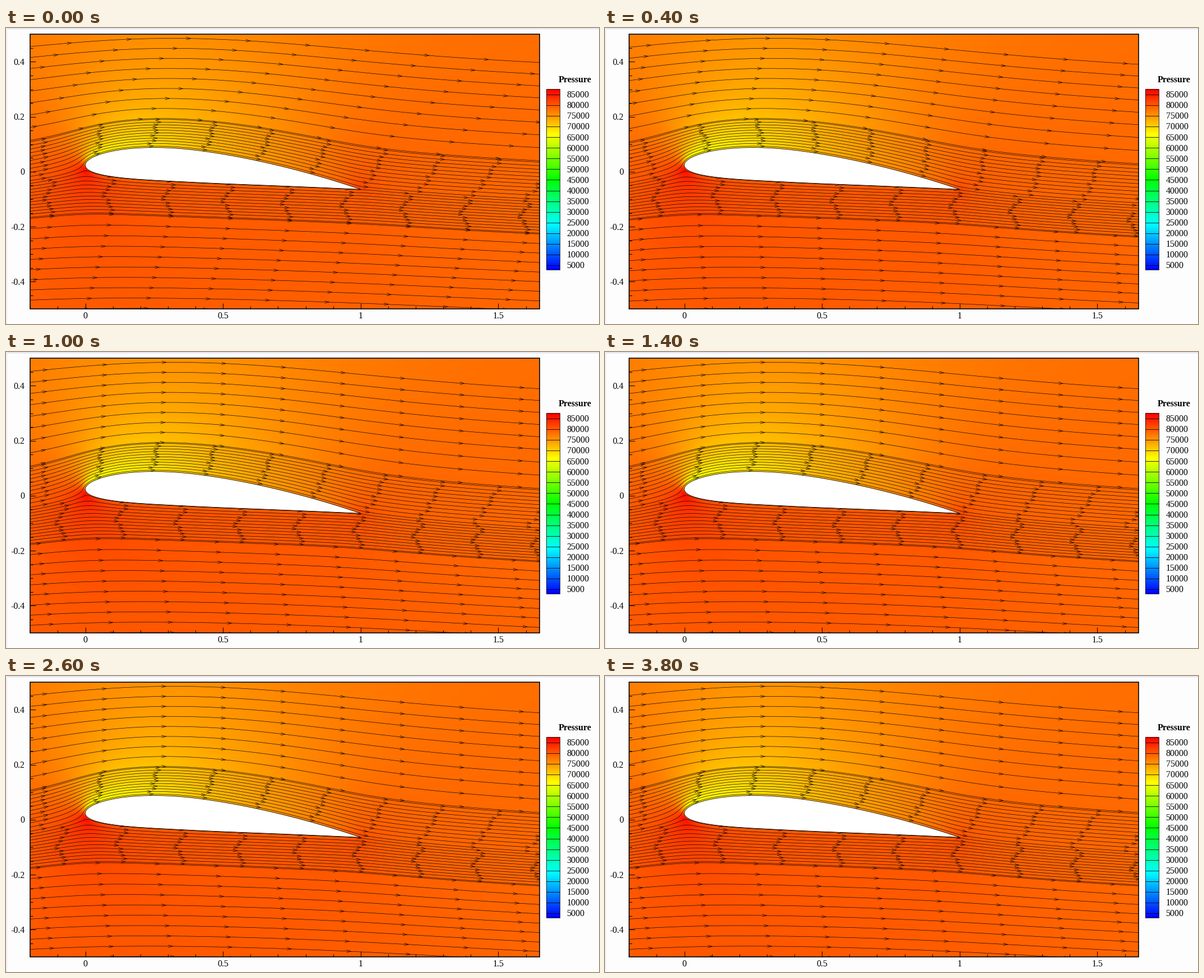
Write a matplotlib script that moves like this. It is 1058 px wide and 529 px high and loops after 4000 ms.

```python
import numpy as np
import matplotlib.pyplot as plt
from matplotlib.animation import FuncAnimation
from matplotlib.collections import LineCollection
from matplotlib.colors import LinearSegmentedColormap
from matplotlib.patches import Polygon, Rectangle

W, H, DPI = 1058, 529, 64
PX = 72 / DPI
FRAMES, STEP = 20, 200
L, R, T, B = 42.5, 951.5, 10.5, 501.5
NOSE_X, NOSE_Y, CHORD = 141, 244, 493
TILT = np.exp(-1j * np.radians(5.1))
P_FAR, P_DYN = 78700, 8800
P_MIN, P_MAX = 2900, 87600
plt.rcParams["font.family"] = "Liberation Serif"


# NACA 3412 section, in chord lengths
def camber(s, m=.03, p=.4):
    front = m / p ** 2 * (2 * p * s - s ** 2)
    rear = m / (1 - p) ** 2 * (1 - 2 * p + 2 * p * s - s ** 2)
    return np.where(s < p, front, rear)


def thickness(s):
    return .6 * (.2969 * np.sqrt(s) - .126 * s - .3516 * s ** 2
                 + .2843 * s ** 3 - .1036 * s ** 4)


def to_plane(x, y):
    return (x - NOSE_X + 1j * (NOSE_Y - y)) / CHORD


beta = np.linspace(0, 2 * np.pi, 121)
chordwise = (1 + np.cos(beta)) / 2
side = np.where(beta < np.pi, 1, -1)
nodes = (chordwise + 1j * (camber(chordwise) + side * thickness(chordwise))) * TILT
starts, spans = nodes[:-1], np.diff(nodes)
lengths = np.abs(spans)


def panel(z, j):
    """Stream function at z of a unit vortex sheet on panel j."""
    w = (z - starts[j]) * lengths[j] / spans[j]
    v = w - lengths[j]
    return (w * np.log(w) - v * np.log(v)).real - lengths[j]


# Sheet strengths: one flow with a smooth trailing edge, one of pure circulation
N = len(spans)
mid = starts + spans / 2
walls = np.column_stack([panel(mid, j) for j in range(N)] + [-np.ones(N)])
kutta = np.zeros(N + 1)
kutta[[0, N - 1]] = 1
full = np.linalg.solve(np.vstack([walls, kutta]), np.append(-mid.imag, 0))
total = np.append(lengths, 0)
spin = np.linalg.solve(np.vstack([walls, total]), np.append(np.zeros(N), total @ full))

X, Y = np.linspace(L, R, 304), np.linspace(0, 520, 261)
gx, gy = np.meshgrid(X, Y)
grid = to_plane(gx, gy) + 1e-7 * (1 + 1j)
PSI, PSI_SPIN = grid.imag.copy(), np.zeros(grid.shape)
for j in range(N):
    influence = panel(grid, j)
    PSI += full[j] * influence
    PSI_SPIN += spin[j] * influence

body = grid / TILT
s = np.clip(body.real, 0, 1)
outside = np.abs(body.imag - camber(s)) > thickness(s) + .01
outside |= np.abs(body.real - .5) > .505


def pressure(psi):
    u = np.gradient(psi, -Y / CHORD, axis=0)
    v = np.gradient(psi, X / CHORD, axis=1)
    p = P_FAR + P_DYN * (1 - u ** 2 - v ** 2)
    for col, ok in zip(p.T, outside.T):
        col[:] = np.interp(Y, Y[ok], col[ok])
    return p


# Seeds on a vertical rake through the thickest part of the wing
RAKE = np.argmin(np.abs(X - 285))
ABOVE = 18 + 17.9 * np.arange(9)
BELOW = 336 + 18.3 * np.arange(10)
OVER = np.linspace(163, 211, 11)
UNDER = np.linspace(273.5, 334, 12)
SEEDS = np.concatenate([ABOVE, OVER, UNDER, BELOW])
rng = np.random.default_rng(4)
RAGGED = rng.uniform(-5, 5, len(SEEDS))


def trace(psi):
    """Height of every streamline in each grid column."""
    levels = np.interp(SEEDS, Y, psi[:, RAKE])
    up = np.maximum.accumulate(psi[::-1], axis=0)
    return np.array([np.interp(levels, col, Y[::-1]) for col in up.T]).T


def arrow_places(k):
    """Horizontal places of the arrow heads on each streamline."""
    w = np.exp(-.8 * k)
    n = np.arange(-5, 12)
    kick = 30 * k * np.exp(1 - k)
    cols = 66 + 101.75 * n
    places = [281 + w * (44 - 24 * i) + 106.3 * n for i in range(len(ABOVE))]
    places += [cols + f * (kick - .058 * (cols - 60)) for f in np.linspace(0, 1, len(OVER))]
    places += [98 - 22 * w + 8 * np.sin(9 * f) + 106 * n
               for f in np.linspace(0, 1, len(UNDER))]
    places += [57 + 3 * i + w * (25 - 8 * i) + 106 * n for i in range(len(BELOW))]
    dense = (np.arange(len(SEEDS)) >= len(ABOVE)) & (SEEDS < BELOW[0])
    return [p + r * d for p, r, d in zip(places, RAGGED, dense)]


def heads(y, xs):
    out = []
    for x in xs[(xs > L + 6) & (xs < R - 1)]:
        y0, y1 = np.interp([x - 4, x + 4], X, y)
        tip = np.array([x + 4, y1])
        d = np.array([8, y1 - y0]) / np.hypot(8, y1 - y0)
        n = np.array([-d[1], d[0]])
        back = tip - 8 * d
        out.append([back + 2.2 * n, tip, back - 2.2 * n])
    return out


# Stage
fig = plt.figure(figsize=(W / DPI, H / DPI), dpi=DPI, facecolor="#fdfdfd")
ax = fig.add_axes([0, 0, 1, 1])
ax.axis("off")
rainbow = LinearSegmentedColormap.from_list(
    "rainbow", ["#0000ff", "#00ffff", "#00ff00", "#ffff00", "#ff0000"], N=1024)
look = dict(cmap=rainbow, vmin=P_MIN, vmax=P_MAX, aspect="auto", interpolation="bilinear")
image = ax.imshow(pressure(PSI), extent=(L, R, Y[-1] + 1, Y[0] - 1), **look)
BAR = (963.5, 987.5, 431.5, 108.5)
ax.imshow(np.linspace(P_MAX, P_MIN, 323)[:, None], extent=BAR, **look)
ax.set_xlim(-.5, W - .5)
ax.set_ylim(H - .5, -.5)


def stroke(xs, ys, width=1, color="black"):
    ax.plot(xs, ys, color=color, lw=width * PX, zorder=6, solid_capstyle="butt")


def label(x, y, text, **kw):
    ax.text(x, y - .7, text, fontsize=16 * PX, va="center_baseline", zorder=6, **kw)


stroke([0, W], [0, 0], 1, "#cfcfdf")
stroke([0, 0], [0, H], 1, "#e4e4ee")

window = Rectangle((L, T), R - L, B - T, fill=False, ec="black", lw=1.6 * PX, zorder=7)
ax.add_patch(window)
image.set_clip_path(window)

streams = LineCollection([], colors="black", linewidths=.65 * PX, zorder=3)
tips = LineCollection([], colors="black", linewidths=.65 * PX, zorder=4)
for c in (streams, tips):
    ax.add_collection(c, autolim=False)
    c.set_clip_path(window)

outline = np.column_stack([NOSE_X + CHORD * nodes.real, NOSE_Y - CHORD * nodes.imag])
ax.add_patch(Polygon(outline, fc="white", ec="black", lw=.8 * PX, zorder=5))

for i in range(-2, 17):
    x = NOSE_X + 49.13 * i
    if L < x < R:
        stroke([x, x], [B, B - (10 if i % 5 == 0 else 5)])
for i in range(-9, 10):
    y = 256.4 - 24.56 * i
    stroke([L, L + (10 if i % 4 == 0 else 5)], [y, y])
for i in range(4):
    label(NOSE_X + 245.6 * i, 513.5, f"{i / 2:g}", ha="center")
for i in range(-2, 3):
    label(33, 256.7 - 98.25 * i, f"{i / 5:g}", ha="right")

label(1015, 91, "Pressure", ha="center", weight="bold")
for i in range(17):
    y = 118.5 + 19.06 * i
    stroke(BAR[:2], [y, y], .8)
    label(1000, y, str(85000 - 5000 * i), ha="left")
ax.add_patch(Rectangle((BAR[0], BAR[3]), 24, 323, fill=False, ec="black",
                       lw=.8 * PX, zorder=6))


def update(k):
    psi = PSI - .15 * np.exp(-.8 * k) * PSI_SPIN
    lines = trace(psi)
    image.set_data(pressure(psi))
    streams.set_segments([np.column_stack([X, y]) for y in lines])
    tips.set_segments([h for y, xs in zip(lines, arrow_places(k)) for h in heads(y, xs)])
    return image, streams, tips


anim = FuncAnimation(fig, update, frames=FRAMES, interval=STEP, repeat=True,
                     repeat_delay=0, blit=False)
plt.show()
```
